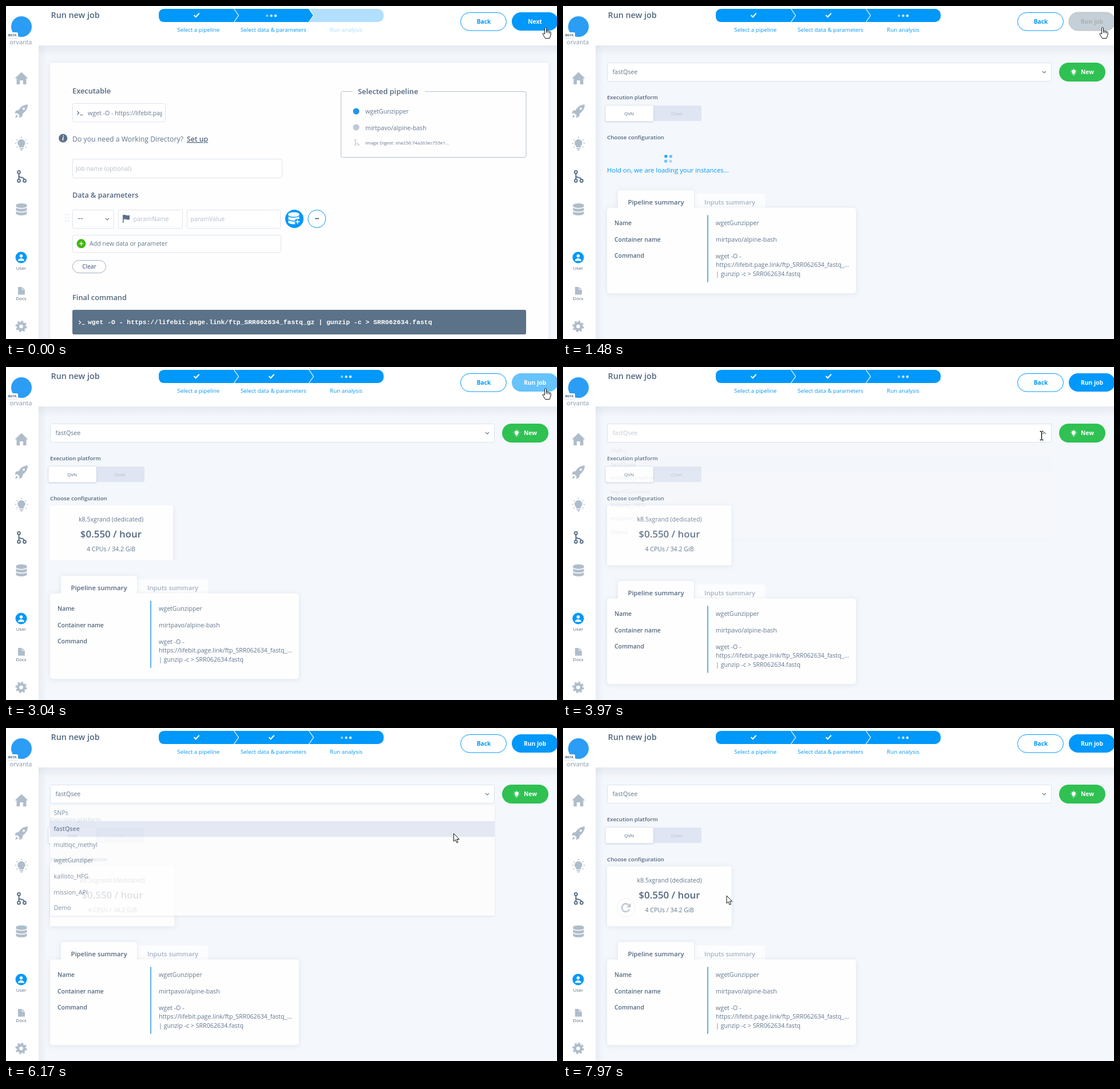
Write an HTML page that moves like this. It is 963 by 582 pixels and loops after 8 s.

```html
<!DOCTYPE html>
<html lang="en">
<head>
<meta charset="utf-8">
<title>Run new job</title>
<style>
html, body { margin: 0; width: 100%; height: 100%; overflow: hidden; background: #fff; }
svg { display: block; font-family: "Open Sans", sans-serif; }
.soft { filter: drop-shadow(0 1px 4px rgba(120, 140, 175, .17)); }
.tight { filter: drop-shadow(0 1px 1px rgba(100, 120, 150, .25)); }
</style>
</head>
<body>
<svg id="stage" width="963" height="582" viewBox="0 0 963 582"></svg>
<script>
const BLUE = '#0098fa', SLATE = '#52677f', TEXT = '#62778e', PALE = '#b3bfcc', ICON = '#afbdcb', EDGE = '#dde4ee';
const $ = id => document.getElementById(id);

// Markup helpers
const text = (x, y, s, size = 10.67, fill = TEXT, weight = 400, more = '') =>
  `<text x="${x}" y="${y}" font-size="${size}" fill="${fill}" font-weight="${weight}" ${more}>${s}</text>`;
const mid = (x, y, s, size, fill, weight, more = '') =>
  text(x, y, s, size, fill, weight, 'text-anchor="middle" ' + more);
const box = (x, y, w, h, r, fill, stroke = 'none', more = '') =>
  `<rect x="${x}" y="${y}" width="${w}" height="${h}" rx="${r}" fill="${fill}" stroke="${stroke}" ${more}/>`;
const disc = (x, y, r, fill, stroke = 'none', more = '') =>
  `<circle cx="${x}" cy="${y}" r="${r}" fill="${fill}" stroke="${stroke}" ${more}/>`;
const line = (d, stroke, width = 1, more = '') =>
  `<path d="${d}" fill="none" stroke="${stroke}" stroke-width="${width}" ${more}/>`;
const shape = (d, fill, more = '') => `<path d="${d}" fill="${fill}" ${more}/>`;
const group = (id, s, more = '') => `<g id="${id}" ${more}>${s}</g>`;
const at = (x, y, s) => `<g transform="translate(${x} ${y})">${s}</g>`;

const check = x => line(`M${x - 4.5} 16l3.2 3.2 6-6.4`, '#fff', 2);
const dots = x => [.5, .8, 1].map((o, i) =>
  disc(x + (i - 1) * 7.4, 17, 2.2, '#fff', 'none', `opacity="${o}"`)).join('');
const prompt = (x, y, color) => line(`M${x} ${y - 3}l3 3-3 3M${x + 5} ${y + 3.5}h5`, color, 1.1);
const branch = (color, width) => line('M-4.5-6V6M-4.5-1C-4.5 3 5 0 5 6', color, width) +
  [[-4.5, -7.5], [-4.5, 7.5], [5.5, 7.5]].map(p => disc(...p, 2.4, '#fff', color, `stroke-width="${width}"`)).join('');
const bulb = (color, k) => `<g transform="scale(${k})">` +
  shape('M-4 4C-10-2-5-8 0-8S10-2 4 4V6H-4ZM-3.5 7.2h7v1.6h-7ZM-2.3 9.8h4.6l-1 1.6h-2.6Z', color) +
  line('M-11-1h2M9-1h2M-8.5-8l1.5 1.3M8.5-8L7-6.7M-8.5 6L-7 5M8.5 6L7 5M0-12v2', color, 1.6) + '</g>';
const stack = (color, gap) => shape('M-9.5-7.5C-9.5-11.5 9.5-11.5 9.5-7.5V7C9.5 11.5-9.5 11.5-9.5 7Z', color) +
  line('M-10-4.5C-7-1 7-1 10-4.5M-10 2C-7 5.5 7 5.5 10 2', gap, 1.5);

const sidebar = box(0, 0, 57, 582, 0, '#fff') +
  disc(27, 36, 18, '#2b9df5') +
  box(1, 46, 20, 9.5, 2, '#fff', 'none', 'class="tight"') + mid(11, 53, 'BETA', 6, SLATE, 700) +
  mid(26, 67, 'orvanta', 10.8, '#8798aa') +
  shape('M27 115.5L38.5 126.5H35.5V137H29.8V130H24.2V137H18.5V126.5H15.5Z', ICON) +
  shape('M38 172C29 173 25 177 22 182L17 183 15.5 188 20 187.5 23.5 191 23 195.5 28 193.5 29.5 188C34 184 38 180 38 172ZM18 190L16 195.5 21.5 193Z', ICON) +
  disc(31, 179.5, 2, '#fff') +
  at(27, 241, bulb(ICON, 1)) +
  at(27, 298, branch('#5a7189', 2)) +
  at(27, 355.5, stack(ICON, '#fff')) +
  disc(26.5, 439.5, 10, BLUE) + disc(26.5, 436.7, 2.8, '#fff') + shape('M21 445.5C21 439.5 32 439.5 32 445.5Z', '#fff') +
  mid(26.5, 461, 'User', 8, SLATE) +
  shape('M21 491h7l5 4.5V504.5H21Z', ICON) + line('M28 491v4.5h5', '#fff', .9) +
  mid(26.5, 514, 'Docs', 8, SLATE) +
  disc(26.5, 560, 8.6, 'none', ICON, 'stroke-width="3" stroke-dasharray="3.4 3.35"') +
  disc(26.5, 560, 5.6, 'none', ICON, 'stroke-width="4.6"');

const header = box(57, 0, 906, 69, 0, '#fff') +
  text(78.5, 21, 'Run new job', 14.3, SLATE, 600) +
  box(267, 5, 393, 23, 10, '#b2dffd') +
  shape('M277 5H529L537.5 16.5 529 28H277Q267 28 267 18V15Q267 5 277 5Z', BLUE) +
  group('third', box(500, 5, 160, 23, 10, BLUE) + check(464) + dots(594.5)) +
  group('second', dots(463.7)) + check(333) +
  line('M398.5 5L406.5 16.5 398.5 28M529.5 5L537.5 16.5 529.5 28', '#fff', 1.2) +
  mid(336.3, 45, 'Select a pipeline', 9.8, BLUE) +
  mid(467.5, 45, 'Select data &amp; parameters', 9.8, BLUE) +
  mid(594.5, 45, 'Run analysis', 9.8, BLUE, 400, 'id="analysis"') +
  box(794.5, 11.5, 80, 31.5, 15.75, '#fff', BLUE) + mid(835, 30.5, 'Back', 10.2, BLUE, 700) +
  box(884, 11, 81, 32, 16, BLUE, 'none', 'id="go"') +
  mid(924.5, 30.5, 'Next', 10.3, '#fff', 700, 'id="goText"');

const formPage = box(77, 99, 871, 500, 4, '#fefefe', 'none', 'class="soft"') +
  text(116, 152.7, 'Executable', 12.8, SLATE, 600) +
  box(116.5, 170.5, 162, 32, 2, '#fff', EDGE) + prompt(124.5, 187, SLATE) +
  `<svg x="143" y="171" width="130" height="31">${text(0, 20, 'wget -O - https://lifebit.page.link', 10.6)}</svg>` +
  disc(99.7, 231, 7.6, '#5b7089') +
  mid(99.7, 235.3, 'i', 12, '#fff', 700, 'font-style="italic" font-family="Liberation Serif, serif"') +
  text(116, 237, 'Do you need a Working Directory?', 12.25) +
  text(316, 237, 'Set up', 12.25, SLATE, 600, 'text-decoration="underline"') +
  box(116.5, 267.5, 366, 33, 2, '#fff', EDGE) + text(122, 287.5, 'Job name (optional)', 10.67, PALE) +
  text(116, 335, 'Data &amp; parameters', 12.6, SLATE, 600) +
  line('M104.5 364V378M109 364V378', '#c9d2dc', 1.5, 'stroke-dasharray="1.5 4"') +
  box(116.5, 356.5, 72, 32, 2, '#fff', EDGE) + text(125.5, 376, '--', 14, SLATE) +
  line('M174 371l3 3 3-3', '#66798d', 1.2) +
  box(196.5, 356.5, 112, 32, 2, '#fff', EDGE) +
  shape('M204 365h1.5v14H204ZM205.5 365.5C209 364 211 367.5 216 365.5V373C211 375 209 371.5 205.5 373Z', '#5b7089') +
  text(222.5, 376, 'paramName', 10.67, PALE) +
  box(316.5, 356.5, 163, 32, 2, '#fff', EDGE) + text(322.5, 376, 'paramValue', 10.67, PALE) +
  disc(504, 372, 16, BLUE) + at(503, 371, stack('#fff', BLUE)) +
  disc(509.5, 377, 5.2, BLUE) + line('M505.5 377h8M509.5 373v8', '#fff', 1.6) +
  disc(543.3, 372, 15.5, '#fff', BLUE) + line('M540 371.5h7', SLATE, 1.8) +
  box(116.5, 400.5, 364, 30, 2, '#fff', EDGE) + disc(131.5, 415.3, 8, '#46b516') +
  line('M128 415.3h7M131.5 411.8v7', '#fff', 1.3) + text(146, 419, 'Add new data or parameter', 10.6) +
  box(116.5, 444.5, 58, 22, 11, '#fff', '#9fb0c1') + mid(145.5, 459, 'Clear', 9.9, TEXT, 600) +
  text(116, 514, 'Final command', 12.8, SLATE, 600) +
  box(116, 531, 793, 43, 3, '#5b7288') + prompt(127.5, 553, '#fff') +
  text(143, 556, 'wget -O - https://lifebit.page.link/ftp_SRR062634_fastq_gz | gunzip -c &gt; SRR062634.fastq',
    11.4, '#fff', 700, 'font-family="Liberation Mono, monospace"') +
  line('M606 149.5H588.5Q585.5 149.5 585.5 152.5V261.5Q585.5 264.5 588.5 264.5H906Q909 264.5 909 261.5V152.5Q909 149.5 906 149.5H732', '#b3c0ce') +
  text(615, 154, 'Selected pipeline', 12.85, SLATE, 600) +
  disc(612, 184, 5.5, '#2496dd') + text(628, 188, 'wgetGunzipper') +
  disc(612, 212, 5.5, '#bccad8') + text(628, 216.5, 'mirtpavo/alpine-bash') +
  at(613, 238.5, `<g transform="scale(.55)">${branch(ICON, 1.6)}</g>`) +
  text(628, 241.5, 'Image Digest: sha256:74a263ec755e1...', 8);

const summary = group('summary',
  box(230, 328, 123, 30, 3, '#fcfdfe') + box(96, 322, 133, 38, 4, '#fefefe', 'none', 'class="soft"') +
  box(77, 352.5, 435, 149.5, 5, '#fefefe', 'none', 'class="soft"') + box(96, 345, 133, 15, 0, '#fefefe') +
  mid(162.5, 346.5, 'Pipeline summary', 11.25, SLATE, 600) + mid(291.5, 346.5, 'Inputs summary', 11.25, '#a5b3c4', 600) +
  ['Name', 'Container name', 'Command'].map((s, i) => text(90, 383 + i * 28.6, s, 10.4, SLATE, 600)).join('') +
  line('M253 365.5V482.5', '#2795e4', 1.5) +
  text(267, 383, 'wgetGunzipper') + text(267, 411.6, 'mirtpavo/alpine-bash') +
  ['wget -O -', 'https://lifebit.page.link/ftp_SRR062634_fastq_...', '| gunzip -c &gt; SRR062634.fastq']
    .map((s, i) => text(267, 440.5 + i * 15.7, s)).join(''));

const card = `<svg id="clip" x="77" y="242" width="222" height="105">` + group('card',
  box(0, 0, 217.5, 104.5, 2, '#fefefe', 'none', 'id="cardBox" class="soft"') +
  group('cardText', mid(109, 28, 'k8.5xgrand (dedicated)', 10.67) + mid(109, 56, '$0.550 / hour', 16.9, SLATE, 600) +
    mid(109, 80, '4 CPUs / 34.2 GiB', 10.6)) +
  group('refresh', disc(33, 72, 16, '#fff', '#eef1f4') + line('M38.8 68.5A7 7 0 1 0 39.2 75', '#bdc7d1', 2.5) +
    shape('M41.5 64V71.5H34Z', '#bdc7d1'))) + '</svg>';

const names = ['SNPs', 'fastQsee', 'multiqc_methyl', 'wgetGunziper', 'kallisto_HFG', 'mission_API', 'Demo'];
const ROW = 28.7;
const menu = group('menu', box(0, 0, 777, 201, 2, '#fefefe', 'none', 'class="tight"') +
  names.map((s, i) => box(0, i * ROW, 777, ROW, 0, 'none', 'none', `id="row${i}"`) +
    text(6.5, i * ROW + 18, s, 10.67, TEXT, 400, `id="name${i}"`)).join(''));

const runPage = box(867, 99, 81, 33, 16.5, '#2fc152') + at(892.5, 115.5, bulb('#fff', .55)) +
  mid(916.5, 119.3, 'New', 10.2, '#fff', 700) +
  box(76.5, 98.5, 778, 34, 3, 'none', '#d3ebfc', 'id="glow" stroke-width="2"') +
  box(77.5, 99.5, 776, 32, 2, '#fff', EDGE, 'id="select"') +
  text(86.5, 119, 'fastQsee', 10.67, TEXT, 400, 'id="value"') +
  line('M84.5 108.5V123', '#333', 1, 'id="caret"') + line('M838 114l3 3 3-3', '#66798d', 1.2, 'id="chevron"') +
  text(77, 162.5, 'Execution platform', 9.65, SLATE, 600) +
  box(158, 174, 84, 27, 2, '#dfe5f2') + box(74, 173.5, 84, 28, 2, '#fff', '#e2e6ef', 'class="tight"') +
  mid(115.5, 191, 'QVN', 8, SLATE) + mid(198.5, 191, 'Olvet', 8, '#b3bfd2') +
  text(77, 233, 'Choose configuration', 9.7, SLATE, 600) +
  group('loading', group('spinner', '') + text(77, 291, 'Hold on, we are loading your instances...', 11.3, BLUE)) +
  card + summary + menu;

const pointers = group('ring', disc(0, 0, 13, '#ffff00', 'none', 'opacity=".47"')) +
  shape('M0 0V13.5L3 10.7 5.2 16 7.5 15 5.3 10H9.7Z', '#fff', 'id="arrow" stroke="#111"') +
  group('hand', shape('M-1.5 1.5Q0-1 1.5 1.5V7Q3 5.5 4 7.3 5.6 6 6.7 8 8.7 7 9.2 9.5V13L7 19.5H-.5L-5 12Q-4.5 9.5-1.5 12Z', '#fff', 'stroke="#111"') +
    line('M1.5 6.5V10M4 7.5V10.5M6.7 8V11', '#111', .9)) +
  line('M-2.5-5.5H0M1-5.5H3.5M.5-5V9M-2.5 9.5H0M1 9.5H3.5', '#111', 1.4, 'id="beam"');

$('stage').innerHTML = `<defs>
  <linearGradient id="down" x2="0" y2="1"><stop stop-color="#c6cedf" stop-opacity=".32"/><stop offset="1" stop-color="#c6cedf" stop-opacity="0"/></linearGradient>
  <linearGradient id="right"><stop stop-color="#c6cedf" stop-opacity=".25"/><stop offset="1" stop-color="#c6cedf" stop-opacity="0"/></linearGradient>
  </defs>` +
  box(0, 0, 963, 582, 0, '#f4f7fb') + box(57, 69, 906, 18, 0, 'url(#down)') + box(57, 69, 14, 513, 0, 'url(#right)') +
  sidebar + header + group('formPage', formPage) + group('runPage', runPage) + group('pointer', pointers);

// Timing helpers
const ramp = (t, a, b) => Math.min(1, Math.max(0, (t - a) / (b - a)));
const smooth = u => u * u * (3 - 2 * u);
const mix = (a, b, u) => `rgb(${a.map((v, i) => Math.round(v + (b[i] - v) * u))})`;
const show = (id, on) => $(id).setAttribute('opacity', Number(on));
const set = (id, key, value) => $(id).setAttribute(key, value);

const VIVID = [0, 152, 250], HOVER = [52, 152, 219], OFF = [212, 213, 215], LIGHT = [102, 195, 252];
const MOVES = [[3090, 3510, 836, 118], [4990, 5390, 782.5, 184.5], [6960, 7190, 541, 245], [7430, 7720, 286, 293]];
const UNFOLD = 52;

function pointerAt(t) {
  let x = 943, y = 37;
  for (const [a, b, nx, ny] of MOVES) {
    const u = smooth(ramp(t, a, b));
    x += (nx - x) * u;
    y += (ny - y) * u;
  }
  return [x, y];
}

function draw(t) {
  const run = t >= 1310, open = t >= 3970 && t < 6000;
  const [x, y] = pointerAt(t);

  show('formPage', !run);
  show('runPage', run);
  show('third', run);
  show('second', !run);
  set('analysis', 'fill', run ? BLUE : '#a9dbfd');

  const goFill = !run ? mix(VIVID, HOVER, ramp(t, 30, 140))
    : t < 1500 ? mix(HOVER, OFF, ramp(t, 1310, 1500))
    : t < 3040 ? mix(OFF, LIGHT, ramp(t, 2840, 3040))
    : mix(LIGHT, VIVID, ramp(t, 3040, 3300));
  const off = run && t < 2900;
  set('go', 'fill', goFill);
  set('go', 'stroke', off ? '#bfc0c2' : 'none');
  set('goText', 'fill', off ? '#adafb1' : '#fff');
  $('goText').textContent = run ? 'Run job' : 'Next';

  // Instances load, then the card unfolds and pushes the summary down
  const shift = UNFOLD * ramp(t, 2830, 3084), done = shift === UNFOLD;
  show('loading', 1 - ramp(t, 2780, 2840));
  $('spinner').innerHTML = [0, 1, 2, 3].map(i => {
    const a = ((t - 2260) * .3 + 190 + i * 90) * Math.PI / 180;
    const wave = Math.abs(((t - 2260) / 1000 + .2 - i * .4 + 8) % 2 - 1);
    return disc(184 + 6 * Math.cos(a), 267 + 6 * Math.sin(a), 2.7, BLUE, 'none', `opacity="${.3 + .7 * wave}"`);
  }).join('');
  show('card', ramp(t, 2820, 2920));
  set('clip', 'height', 52.5 + shift);
  $('clip').style.overflow = done ? 'visible' : 'hidden';
  set('cardBox', 'width', done ? 217.5 : 215);
  set('cardText', 'transform', `translate(${done ? 0 : -2.5} 0)`);
  show('refresh', ramp(t, 7720, 7970));
  set('summary', 'transform', `translate(0 ${shift})`);

  // Select box and its menu
  const focus = ramp(t, 3960, 4250) * (1 - ramp(t, 6000, 6150));
  show('glow', focus);
  set('select', 'stroke', mix([221, 228, 238], [118, 193, 246], focus));
  set('value', 'fill', open ? '#c3cbd4' : TEXT);
  set('chevron', 'transform', `rotate(${open ? 180 : 0} 841 115.5)`);
  show('caret', open && Math.floor((t - 3990) / 530) % 2 === 0);
  const menuOn = t < 5900 ? 1 - (1 - ramp(t, 3960, 4290)) ** 4 : 1 - ramp(t, 6040, 6240) ** 4;
  show('menu', menuOn);
  set('menu', 'transform', `translate(77 135) scale(1 ${.8 + .2 * menuOn})`);
  const marked = t > 4990 && y > 135 && y < 135 + ROW ? 0 : 1;
  for (const i of [0, 1]) set('row' + i, 'fill', i !== marked ? 'none' : t < 6000 ? '#eef1f8' : '#e0e5f2');
  set('name1', 'font-weight', t < 6000 ? 400 : 600);
  set('name1', 'fill', SLATE);

  const kind = (x > 884 && y < 43) || (open && y > 135) ? 'hand' : open ? 'beam' : 'arrow';
  for (const k of ['arrow', 'hand', 'beam']) show(k, k === kind);
  show('ring', [[370, 460], [3820, 3970], [5850, 6000]].some(([a, b]) => t >= a && t < b));
  set('pointer', 'transform', `translate(${x} ${y})`);
}

const start = performance.now();
function tick() {
  draw((performance.now() - start) % 8000);
  requestAnimationFrame(tick);
}
tick();
</script>
</body>
</html>
```
